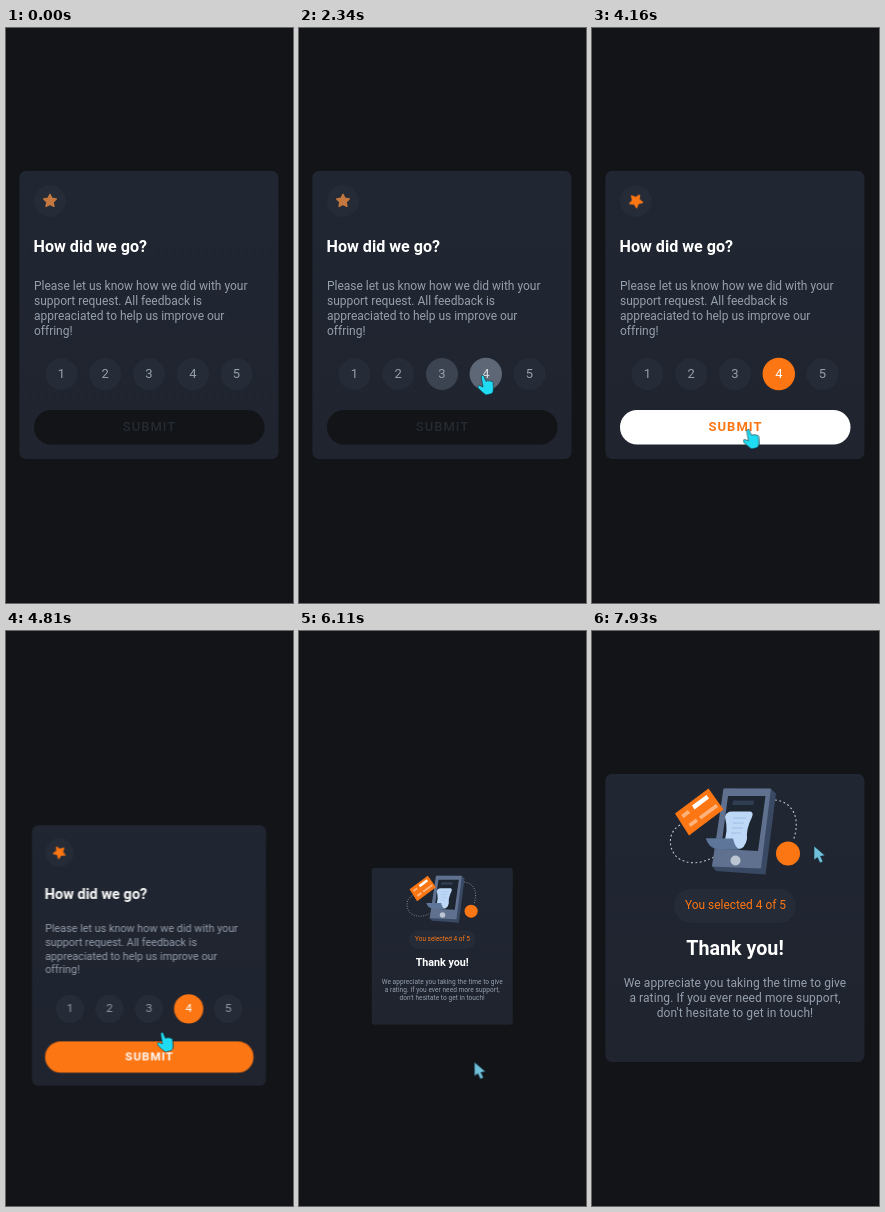
Recreate the animation shown at these times as an HTML page. Size 287 by 575 pixels, loop 8000 ms.

```html
<!DOCTYPE html>
<html lang="en">
<head>
<meta charset="utf-8">
<title>Rating card</title>
<style>
  :root { --ink: #121417; --chip: #252c37; --grey: #7c8798; --soft: #969fad; --orange: #fc7614; }
  html, body { margin: 0; width: 100%; height: 100%; overflow: hidden; background: #131418; }
  svg { display: block; width: 100%; height: 100%; font-family: Roboto, sans-serif; }
  svg * { animation: 8s linear infinite; }

  .panel { fill: url(#panel); }
  .copy { font-size: 12px; fill: var(--soft); letter-spacing: -.02px; }
  .title { font-weight: 700; fill: #fff; }
  .mid { text-anchor: middle; }
  .copy.mid { letter-spacing: .09px; }
  .chip { fill: var(--chip); }
  .num { font-size: 13px; fill: var(--soft); text-anchor: middle; }

  /* Rating card */
  .rate { transform-origin: 143.5px 575px; animation-name: zoom-out-up; }
  @keyframes zoom-out-up {
    0%, 59.625% { opacity: 1; transform: scale(1) translateY(0); animation-timing-function: ease; }
    63.075% { opacity: 1; transform: scale(.475) translateY(60px); animation-timing-function: cubic-bezier(.55, .055, .675, .19); }
    68.25%, 100% { opacity: 0; transform: scale(.1) translateY(-2700px); }
  }
  .star { animation-name: star; }
  @keyframes star {
    0%, 33.5% { fill: #c4773f; stroke: #c4773f; transform: rotate(0); }
    36% { fill: var(--orange); stroke: var(--orange); }
    60%, 100% { fill: var(--orange); stroke: var(--orange); transform: rotate(44deg); }
  }
  .hover { animation-name: hover; }
  @keyframes hover {
    0%, 8.75%, 100% { fill: var(--chip); }
    3.5%, 5% { fill: var(--grey); }
  }
  .pick { animation-name: pick; }
  @keyframes pick {
    0%, 27% { fill: var(--chip); }
    30.5%, 34% { fill: var(--grey); }
    36%, 100% { fill: var(--orange); }
  }
  .pick-num { animation-name: pick-num; }
  @keyframes pick-num {
    0%, 27% { fill: var(--soft); }
    30.5%, 100% { fill: #fff; }
  }
  .submit { transform-origin: 143px 399px; animation-name: rubber-band; }
  @keyframes rubber-band {
    0%, 34.5%, 47%, 100% { transform: scale(1, 1); animation-timing-function: ease; }
    38.25% { transform: scale(1.25, .75); animation-timing-function: ease; }
    39.5% { transform: scale(.75, 1.25); animation-timing-function: ease; }
    40.75% { transform: scale(1.15, .85); animation-timing-function: ease; }
    42.625% { transform: scale(.95, 1.05); animation-timing-function: ease; }
    43.875% { transform: scale(1.05, .95); animation-timing-function: ease; }
  }
  .face { animation-name: face; }
  @keyframes face {
    0%, 34.5% { fill: var(--ink); }
    36%, 42.3% { fill: var(--orange); }
    44.4%, 58.2% { fill: #fff; }
    59.6%, 100% { fill: var(--orange); }
  }
  .label { font-size: 13px; letter-spacing: 1px; text-anchor: middle; animation-name: label; }
  @keyframes label {
    0%, 34.5% { fill: #252b33; font-weight: 500; }
    36%, 42.3% { fill: #fff; font-weight: 700; }
    44.4%, 58.2% { fill: var(--orange); font-weight: 700; }
    59.6%, 100% { fill: #fff; font-weight: 700; }
  }

  /* Thank-you card */
  .thanks { transform-origin: 143.5px 287px; animation-name: zoom-in-down; }
  @keyframes zoom-in-down {
    0%, 68.75% { opacity: 0; transform: scale(.1) translateY(-1150px); animation-timing-function: cubic-bezier(.55, .055, .675, .19); }
    76.25% { opacity: 1; transform: scale(.475) translateY(60px); animation-timing-function: cubic-bezier(.175, .885, .32, 1); }
    81.25%, 100% { opacity: 1; transform: scale(1) translateY(0); }
  }

  /* Pointer */
  .pointer { animation-name: roam; animation-timing-function: ease-in-out; }
  @keyframes roam {
    0%, 3% { transform: translate(110px, 590px); }
    11%, 13% { transform: translate(54px, 343px); }
    17%, 18.5% { transform: translate(98px, 342px); }
    22.5%, 24% { transform: translate(141px, 344px); }
    29%, 36.5% { transform: translate(182px, 347px); }
    43%, 70.5% { transform: translate(154.5px, 401px); }
    79%, 88% { transform: translate(180.5px, 438.5px); }
    99%, 100% { transform: translate(222px, 215px); }
  }
  .arrow { fill: #70c0da; animation-name: arrow; animation-timing-function: step-end; }
  @keyframes arrow {
    0%, 70.6% { opacity: 1; }
    10.5% { opacity: 0; }
  }
  .hand { fill: #1fdcf3; animation-name: hand; animation-timing-function: step-end; }
  @keyframes hand {
    0%, 70.6% { opacity: 0; }
    10.5% { opacity: 1; }
  }
</style>
</head>
<body>
<svg viewBox="0 0 287 575" preserveAspectRatio="none">
  <defs>
    <linearGradient id="panel" x2="0" y2="1">
      <stop stop-color="#212732"/>
      <stop offset="1" stop-color="#1f242f"/>
    </linearGradient>
  </defs>

  <g class="rate">
    <rect class="panel" x="13.4" y="143" width="259" height="288" rx="6.5"/>
    <circle class="chip" cx="44" cy="173" r="16"/>
    <g transform="translate(44 173)">
      <path class="star" stroke-width="1.4" stroke-linejoin="round"
        d="M0-6.6 2-2.7 6.3-2 3.2 1 3.9 5.4 0 3.3-3.9 5.4-3.2 1-6.3-2-2-2.7Z"/>
    </g>
    <text class="title" x="27.5" y="224" font-size="16.1">How did we go?</text>
    <g class="copy">
      <text x="28" y="261.5">Please let us know how we did with your</text>
      <text x="28" y="276.5">support request. All feedback is</text>
      <text x="28" y="291.5">appreaciated to help us improve our</text>
      <text x="28" y="306.5">offring!</text>
    </g>
    <circle class="chip hover" style="animation-delay:.84s" cx="55.5" cy="346" r="16"/>
    <circle class="chip hover" style="animation-delay:1.28s" cx="99.2" cy="346" r="16"/>
    <circle class="chip hover" style="animation-delay:1.72s" cx="143" cy="346" r="16"/>
    <circle class="chip pick" cx="186.8" cy="346" r="16.2"/>
    <circle class="chip" cx="230.5" cy="346" r="16"/>
    <g class="num">
      <text x="55.5" y="350">1</text>
      <text x="99.2" y="350">2</text>
      <text x="143" y="350">3</text>
      <text class="pick-num" x="186.8" y="350">4</text>
      <text x="230.5" y="350">5</text>
    </g>
    <g class="submit">
      <rect class="face" x="28" y="382" width="230.5" height="34.5" rx="17.2"/>
      <text class="label" x="143.5" y="403.3">SUBMIT</text>
    </g>
  </g>

  <g class="thanks">
    <rect class="panel" x="13.4" y="143" width="259" height="288" rx="6.5"/>
    <g fill="none" stroke="#c3cad6" stroke-width="1.1" stroke-dasharray="1.8 2.6">
      <path d="M88 194C75 201 76 219 86 227Q101 237 122 226"/>
      <path d="M183 169C202 171 209 189 201 210"/>
    </g>
    <path fill="#394963" d="M133 157.500 179 158 184 162.500 173.500 243.500 124 240 120 235Z"/>
    <path fill="#60718f" d="M131.500 157.500H179L169 237.500 120 235.500Z"/>
    <path fill="#1d2531" d="M136 165H173.500L166 220 129 218Z"/>
    <path fill="#303d52" d="M141 169.500H162L161.300 174H140.300Z"/>
    <path fill="#526888" d="M114 207.500H142L146 218.500H125Q116 216 114 207.500Z"/>
    <path fill="#bdd7f6" d="M133 186Q134 180.500 140 180.500H158Q162 181 160 186 154 198 155 208 153 218 146 218 133 218 131 213 137 201 133 186Z"/>
    <path fill="none" stroke="#a0bfe6" d="M141 187H154M141 192H152M140 197H151M139 202H149"/>
    <path fill="#5d7699" d="M114 207.500H141Q143 217 148 218.500H128Q117 217 114 207.500Z"/>
    <circle cx="143.500" cy="229.500" r="5" fill="#bcc5d2"/>
    <path fill="var(--orange)" d="M83 182.500 116.500 157.500 131.500 178.500 97 204.500Z"/>
    <path fill="#fff" d="M100 174.500 114.500 164 117 167.500 102.500 178.500Z"/>
    <g stroke="#ffb37a" stroke-width="3.600">
      <path d="M90.500 185.500 97 180.500M97.500 194.500 105 189M108 187 125 174.500"/>
    </g>
    <circle cx="196" cy="222.500" r="12" fill="var(--orange)"/>
    <rect class="chip" x="82" y="258" width="122" height="34" rx="17"/>
    <text class="mid" x="143.500" y="278" font-size="11.9" fill="var(--orange)">You selected 4 of 5</text>
    <text class="title mid" x="143" y="324" font-size="19.7">Thank you!</text>
    <g class="copy mid">
      <text x="143" y="356">We appreciate you taking the time to give</text>
      <text x="143" y="371">a rating. If you ever need more support,</text>
      <text x="143" y="386">don't hesitate to get in touch!</text>
    </g>
  </g>

  <g class="pointer" stroke="#14303a" stroke-width=".6" stroke-linejoin="round">
    <path class="arrow" d="M0 0V14L3.400 11.500 6 17 9 15.500 6.500 10.300 11 9.500Z"/>
    <path class="hand" d="M.2 2Q.6-.2 2.500.4L5 6.500Q6 5 7.400 6 9 5 10 6.400 11.700 5.800 12 7.500L12.400 14Q12.400 17 11 18.500L5 20Q2 18-3 13-3.900 10.300-1.500 10.400L2 12Z"/>
  </g>
</svg>
</body>
</html>
```
